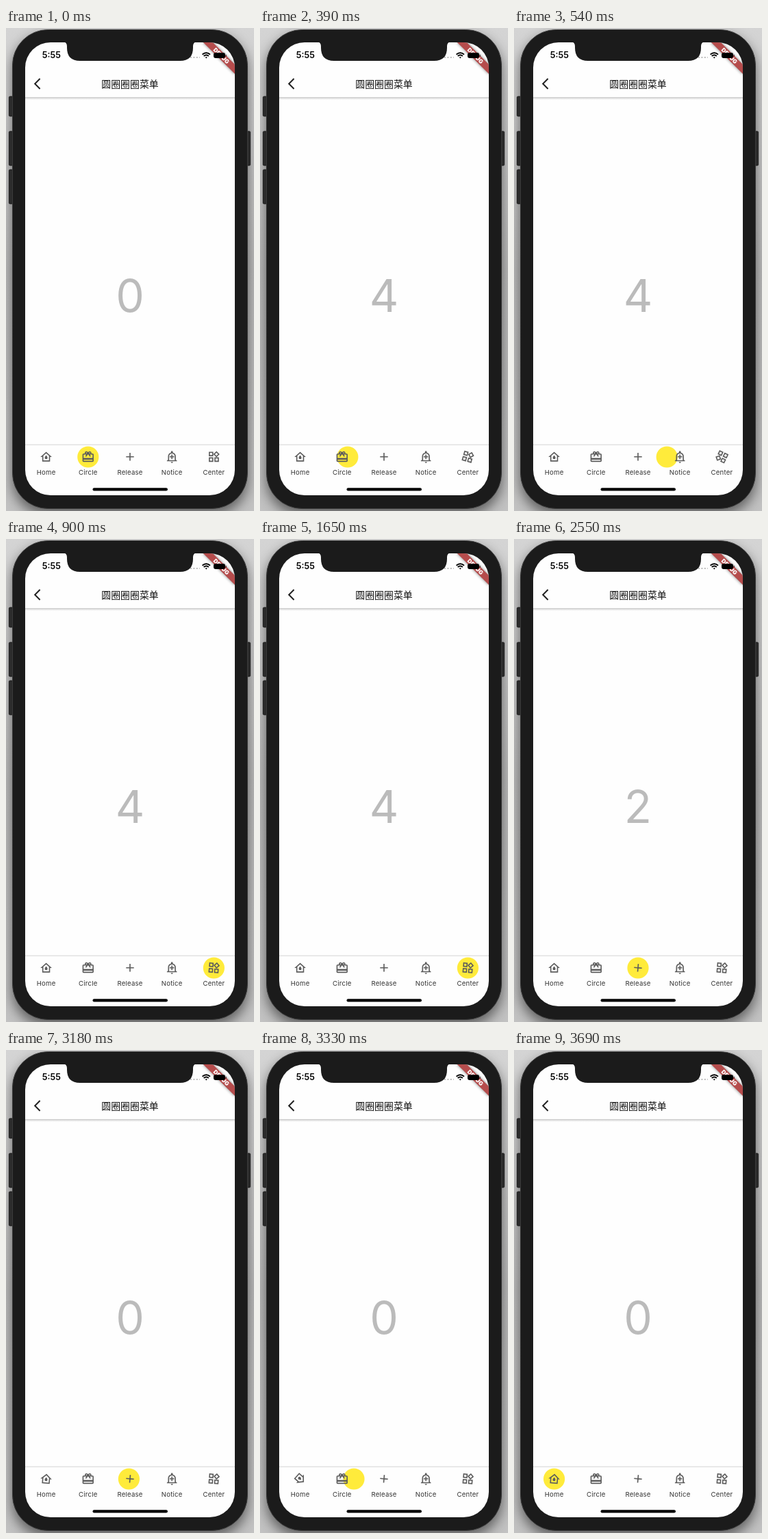
Recreate the animation shown at these times as an HTML page. Size 362x706 px, loop 3.78 s.

```html
<!DOCTYPE html>
<html lang="zh">
<head>
<meta charset="utf-8">
<style>
  html, body { margin: 0; width: 100%; height: 100%; overflow: hidden; background: #ccc; }
  svg { display: block; width: 362px; height: 706px; }
  text { font-family: Inter, Roboto, sans-serif; text-anchor: middle; }
  .title { font: 500 13.9px "Noto Sans CJK SC", "Noto Sans CJK", sans-serif; }
  .label { font-size: 9.6px; letter-spacing: .2px; fill: #333; }
</style>
</head>
<body>
<svg viewBox="0 0 362 706">
  <defs>
    <linearGradient id="wall" x2="0" y2="1">
      <stop offset="0" stop-color="#d4d4d4"/>
      <stop offset=".5" stop-color="#bcbcbc"/>
      <stop offset="1" stop-color="#c2c2c2"/>
    </linearGradient>
    <linearGradient id="fade" x2="0" y2="1">
      <stop offset="0" stop-color="#c8c8c8"/>
      <stop offset="1" stop-color="#fff"/>
    </linearGradient>
    <filter id="blur" x="-20%" y="-20%" width="140%" height="140%"><feGaussianBlur stdDeviation="9"/></filter>
    <filter id="soft" x="-20%" y="-60%" width="140%" height="220%"><feGaussianBlur stdDeviation="2"/></filter>
    <clipPath id="screen"><rect x="28" y="21" width="306" height="662" rx="37"/></clipPath>
  </defs>

  <rect width="362" height="706" fill="url(#wall)"/>
  <rect x="9" y="10" width="344" height="702" rx="52" opacity=".5" filter="url(#blur)"/>

  <g fill="#2b2b2b" stroke="#111" stroke-width=".8">
    <rect x="4.4" y="100" width="8" height="29" rx="1.5"/>
    <rect x="4.4" y="151" width="8" height="50" rx="1.5"/>
    <rect x="4.4" y="207" width="8" height="50" rx="1.5"/>
    <rect x="349" y="151" width="7.6" height="50" rx="1.5"/>
  </g>
  <rect x="9.5" y="2.5" width="343" height="700" rx="52" fill="#1b1b1b" stroke="#3c3c3c"/>

  <g clip-path="url(#screen)">
    <rect x="28" y="21" width="306" height="662" fill="#fefefe"/>
    <rect x="28" y="101" width="306" height="4" fill="url(#fade)"/>
    <rect x="28" y="608.5" width="306" height="1.2" fill="#dcdcdc"/>

    <g transform="translate(334 21) rotate(45)">
      <rect x="-33" y="22.8" width="66" height="9.8" opacity=".5" filter="url(#soft)"/>
      <rect x="-33" y="22.8" width="66" height="9.8" fill="#b54c4c"/>
      <text y="30.7" font-size="8.3" font-weight="900" fill="#fff">DEBUG</text>
    </g>
    <path d="M82 20h198q-7 0-7 7v2q0 19-19 19H108q-19 0-19-19v-2q0-7-7-7z" fill="#1b1b1b"/>
  </g>

  <text x="66.3" y="44.3" font-size="12.6" font-weight="600">5:55</text>
  <path d="M269 43h14" stroke="#bbb" stroke-width="1.8" stroke-dasharray="2 2.4"/>
  <g fill="none" stroke="#000" stroke-width="1.9">
    <path d="M286.6 38.7q5.7-4.8 11.4 0M288.7 41q3.6-3 7.2 0"/>
    <path d="M292.3 44.4l-1.6-1.6q1.6-1.3 3.2 0z" fill="#000" stroke="none"/>
  </g>
  <rect x="303" y="36.3" width="17" height="7.6" rx="2.4"/>
  <rect x="320.8" y="38.8" width="1.2" height="2.8" rx=".6" opacity=".6"/>

  <path d="M49.6 74l-7.4 7.5 7.4 7.5" fill="none" stroke="#222" stroke-width="2"/>
  <text class="title" x="181" y="86.6" fill="#111">圆圈圈圈菜单</text>
  <text id="count" x="181" y="415.3" font-size="66" fill="#bbb"></text>

  <circle id="dot" cy="627" r="15.6" fill="#ffeb3b"/>
  <g id="tabs"></g>
  <rect x="126.5" y="672.3" width="109.5" height="4.2" rx="2.1"/>
</svg>

<script>
const LOOP = 3780, STEP = 30, MOVE = 500, TURN = 365;
const tabs = [
  ["Home", "M12 3L1.8 12.2H5V20.5H19V12.2H22.2zM12 5.7L17 10.2V18.5H7V10.2zM12 9.3c-1.8 2.3-2.5 3.2-2.5 4.4a2.5 2.5 0 0 0 5 0c0-1.200-.7-2.100-2.500-4.400z"],
  ["Circle", "M20 6h-2.180c.11-.31.18-.65.18-1 0-1.660-1.340-3-3-3-1.050 0-1.960.54-2.500 1.350l-.5.67-.5-.68C10.960 2.540 10.050 2 9 2 7.340 2 6 3.340 6 5c0 .35.07.69.18 1H4c-1.110 0-2 .89-2 2v11c0 1.110.89 2 2 2h16c1.110 0 2-.89 2-2V8c0-1.110-.89-2-2-2zM15 4a1 1 0 0 1 0 2a1 1 0 0 1 0-2zM9 4a1 1 0 0 1 0 2a1 1 0 0 1 0-2zM20 19H4v-2h16zM20 14H4V8h5.080L7 10.830 8.620 12 12 7.400 15.380 12 17 10.830 14.920 8H20z"],
  ["Release", "M19 13h-6v6h-2v-6H5v-2h6V5h2v6h6z"],
  ["Notice", "M10 21a2 2 0 0 0 4 0zM12 6c2.760 0 5 2.240 5 5v7H7v-7c0-2.760 2.240-5 5-5zM12 1.500c-.83 0-1.500.67-1.500 1.500v1.170C7.360 4.850 5 7.650 5 11v6l-2 2v1h18v-1l-2-2v-6c0-3.350-2.360-6.150-5.500-6.830V3c0-.83-.67-1.500-1.500-1.500zM11 8v3H8v2h3v3h2v-3h3v-2h-3V8z"],
  ["Center", "M16.660 4.520l2.830 2.830-2.830 2.830-2.830-2.830zM16.660 1.690L11 7.340 16.660 13l5.660-5.660zM5 5h4v4H5zM3 3v8h8V3zM15 15h4v4h-4zM13 13v8h8v-8zM5 15h4v4H5zM3 13v8h8v-8z"]
];
// show: when the tap becomes visible; start: origin of the easing
const taps = [
  { show: 270, start: 279, from: 1, to: 4 },
  { show: 2055, start: 2055, from: 4, to: 2 },
  { show: 3180, start: 3106, from: 2, to: 0 }
];

const get = id => document.getElementById(id);
const tabX = i => 58.6 + 61.2 * i;
const ease = t => t < .5 ? 4 * t ** 3 : 1 - 4 * (1 - t) ** 3;

get("tabs").innerHTML = tabs.map(([name, d], i) => `
  <path d="${d}" fill="#5c5c5c" fill-rule="evenodd"/>
  <text class="label" x="${tabX(i)}" y="652.8">${name}</text>`).join("");
const icons = document.querySelectorAll("#tabs path");

function draw(time) {
  const angles = [0, 0, 0, 0, 0];
  let x = tabX(1), count = 0;
  for (const { show, start, from, to } of taps) {
    if (time < show) break;
    const p = ease(Math.min(1, Math.max(0, (time - start) / MOVE)));
    x = tabX(from) + (tabX(to) - tabX(from)) * p;
    angles[to] = TURN * p;
    count = to;
  }
  get("dot").setAttribute("cx", x);
  get("count").textContent = count;
  icons.forEach((icon, i) => icon.setAttribute("transform",
    `translate(${tabX(i)} 626.8) rotate(${angles[i]}) scale(.816) translate(-12 -12)`));
}

const origin = performance.now();
function tick() {
  const time = (performance.now() - origin) % LOOP;
  draw(Math.floor(time / STEP) * STEP);
  requestAnimationFrame(tick);
}
tick();
</script>
</body>
</html>
```
